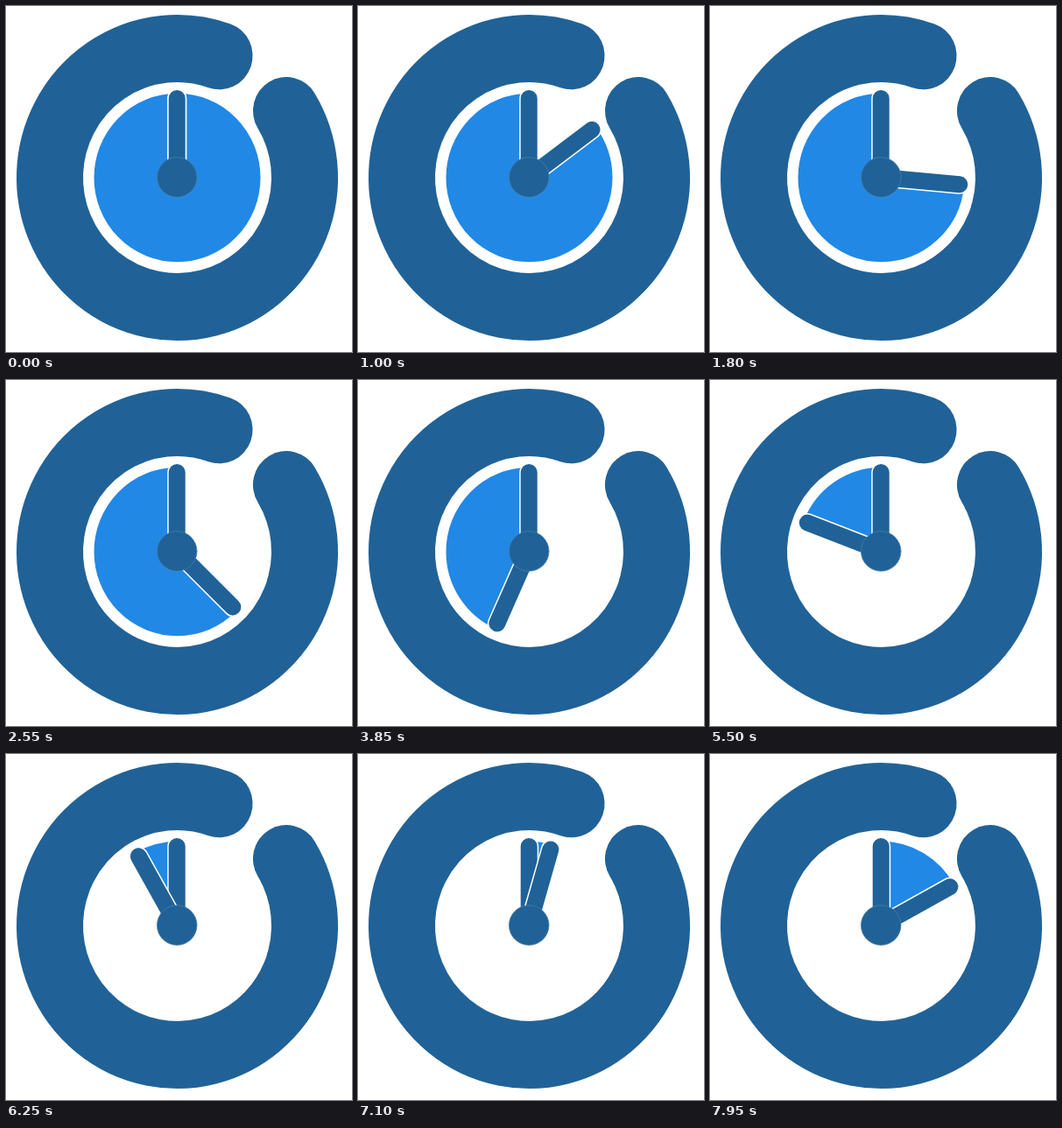
An HTML page that plays this animation: 395x395 px, repeating every 8000 ms.

```html
<!DOCTYPE html>
<html lang="en">
<head>
<meta charset="utf-8">
<title>Timer</title>
<style>
  html, body { margin: 0; width: 100%; height: 100%; overflow: hidden; background: #fff; }
  svg { display: block; width: 100%; height: 100%; }
  .hand line { stroke-linecap: round; stroke: #206297; stroke-width: 19; }
  .hand .edge { stroke: #fff; stroke-width: 22; }
</style>
</head>
<body>
<svg viewBox="0 0 395 395">
  <g transform="translate(195.5 196) scale(1 1.0136)" fill="none">
    <path id="ring" stroke="#206297" stroke-width="76" stroke-linecap="round"/>
    <circle id="wedge" r="47.5" pathLength="360" transform="rotate(-90)" stroke="#2188e6" stroke-width="95"/>
  </g>
  <g transform="translate(195.2 195.5)">
    <g class="hand"><line class="edge" y2="-90"/><line y2="-90"/></g>
    <g class="hand" id="sweep"><line class="edge" y2="-90"/><line y2="-90"/></g>
    <circle r="22.8" fill="#206297" stroke="#4c80aa" stroke-width=".7"/>
  </g>
</svg>
<script>
  const LOOP = 8000, STEP = 50, TURN = 6800;
  const ring = document.getElementById('ring');
  const wedge = document.getElementById('wedge');
  const sweep = document.getElementById('sweep');

  // Clock angle in degrees to a point on a circle.
  const point = (angle, radius) => {
    const rad = angle * Math.PI / 180;
    return `${radius * Math.sin(rad)} ${-radius * Math.cos(rad)}`;
  };
  ring.setAttribute('d', `M${point(58.8, 145.5)}A145.5 145.5 0 1 1 ${point(19.3, 145.5)}`);

  function draw(now) {
    const time = Math.floor(now % LOOP / STEP) * STEP;
    const angle = time % TURN / TURN * 360;
    // The first turn empties the dial, the next one fills it again.
    const dashes = time < TURN ? `0 ${angle} ${360 - angle} 360` : `${angle} 360`;
    wedge.setAttribute('stroke-dasharray', dashes);
    sweep.setAttribute('transform', `rotate(${angle})`);
  }

  const start = performance.now();
  function tick() {
    draw(performance.now() - start);
    requestAnimationFrame(tick);
  }
  tick();
</script>
</body>
</html>
```
